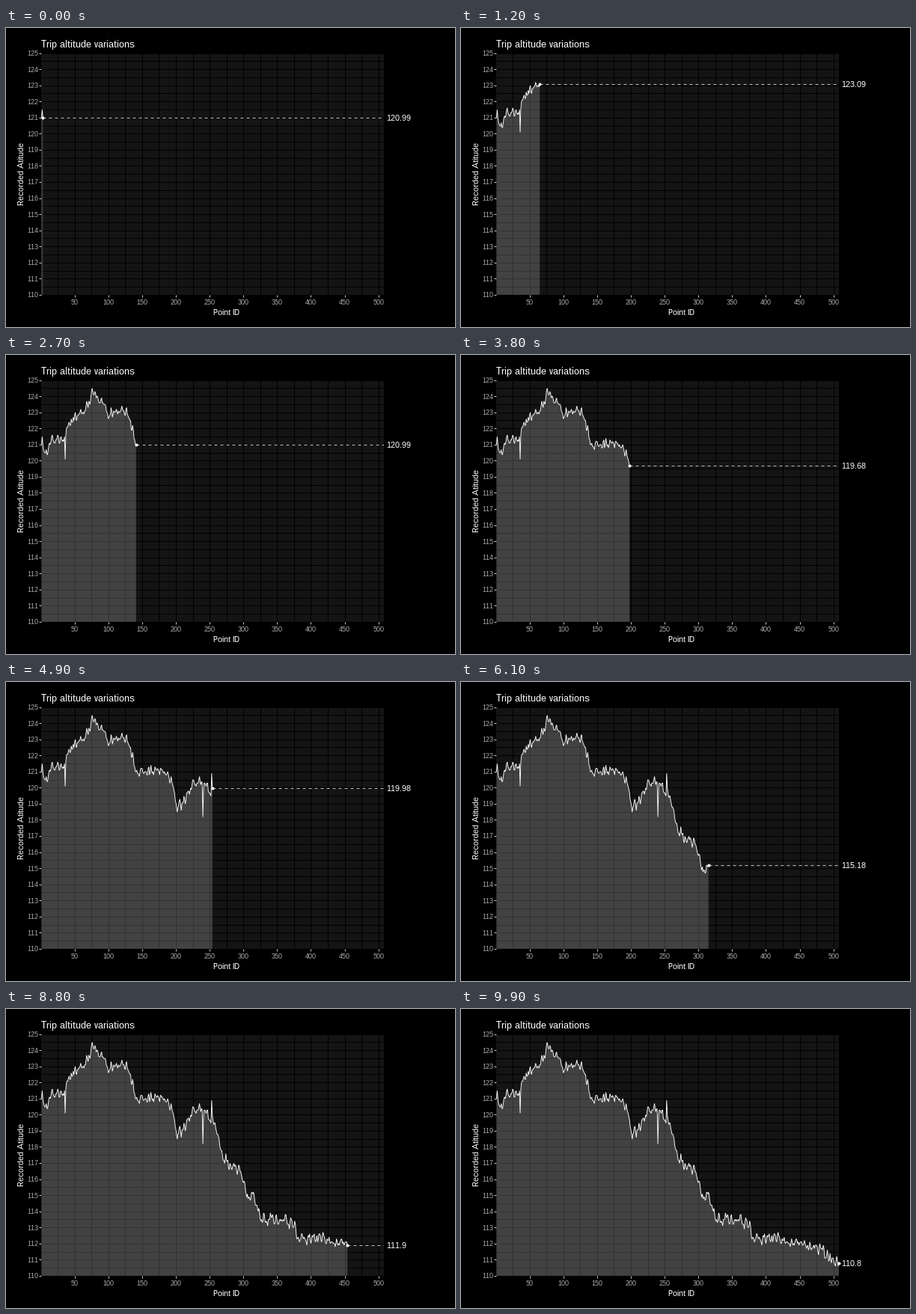
Write a matplotlib script that moves like this. It is 600 by 400 pixels and loops after 10000 ms.

```python
import matplotlib.pyplot as plt
import numpy as np
from matplotlib.animation import FuncAnimation
from matplotlib.ticker import MultipleLocator

W, H, PX = 600, 400, 0.72  # stage in pixels, points per pixel at 100 dpi
LEFT, RIGHT, UPPER, LOWER = 47.46, 504.87, 33.5, 356.9  # panel edges in pixels
FRAMES, STEP_MS = 100, 100
POINTS, FLOOR, TOP = 508, 110, 125

# Key points of the trip (point id, altitude) and single-reading spikes
TURNS = [
    (1, 121), (3, 121), (9, 120.4), (17, 121.6), (35, 121.5), (41, 122.3),
    (65, 123.1), (77, 124.3), (103, 122.9), (127, 123.3), (141, 121),
    (178, 121.2), (194, 120.4), (202, 118.5), (226, 120.5), (254, 120),
    (271, 117.2), (295, 116.5), (307, 114.8), (315, 115.2), (325, 113.5),
    (372, 113.4), (382, 112.3), (403, 112.4), (475, 111.9), (508, 110.8),
]
SPIKES = {2: 0.5, 36: -1.5, 240: -2, 253: 0.9}


def make_track():
    """Altitudes through the key points, with sensor jitter in 0.1 steps."""
    ids = np.arange(1, POINTS + 1)
    turn_ids, turn_alts = np.array(TURNS).T
    alt = np.interp(ids, turn_ids, turn_alts)
    noise = np.random.default_rng(7).normal(0, 0.3, POINTS)
    jitter = np.convolve(noise, [0.5, 0.5], "same").clip(-0.5, 0.5)
    jitter[turn_ids.astype(int) - 1] = 0
    for at, jump in SPIKES.items():
        jitter[at - 1] = jump
    alt = np.round(alt + jitter, 1)
    drift = np.select([alt > 120.5, alt > 114], [0.01, 0.02], 0)
    return ids, np.round(alt - drift, 2)


ids, alt = make_track()

plt.rcParams.update({
    "font.family": "Liberation Sans",
    "text.hinting": "native",
    "text.hinting_factor": 1,
})
fig = plt.figure(figsize=(W / 100, H / 100), dpi=100, facecolor="black")
ax = fig.add_axes([LEFT / W, 1 - LOWER / H, (RIGHT - LEFT) / W,
                   (LOWER - UPPER) / H], facecolor="#141414")
ax.set(xlim=(1, POINTS), ylim=(FLOOR, TOP))
ax.set_axisbelow(True)
ax.spines[:].set_visible(False)

for axis, step in ((ax.xaxis, 50), (ax.yaxis, 1)):
    axis.set_major_locator(MultipleLocator(step))
    axis.set_minor_locator(MultipleLocator(step / 2))
ax.grid(which="both", color="black", lw=PX)
ax.tick_params(which="minor", length=0)
ax.tick_params(which="major", length=3 * PX, width=PX, color="#cccccc",
               labelcolor="#b3b3b3", labelsize=9 * PX)
ax.tick_params(axis="x", pad=3.6 * PX)
ax.tick_params(axis="y", pad=1.5 * PX)


def caption(x, y, text, size, **kw):
    fig.text(x / W, 1 - y / H, text, color="white", fontsize=size * PX, **kw)


caption(47, 26, "Trip altitude variations", 13)
caption(294.5, 384, "Point ID", 11, ha="center")
caption(21.5, 195, "Recorded Atitude", 11, rotation=90, ha="center", va="center")

area, = ax.fill([1], [FLOOR], color="white", alpha=0.2, lw=0, zorder=2)
guide, = ax.plot([], [], color="#bebebe", lw=PX, ls=(0, (4, 4)),
                 dash_capstyle="butt", zorder=3)
trace, = ax.plot([], [], color="white", lw=0.9 * PX, solid_joinstyle="bevel",
                 clip_on=False, zorder=4)
dot, = ax.plot([], [], "o", color="white", ms=4 * PX, mew=0,
               clip_on=False, zorder=5)
label = ax.text(511.5, FLOOR, "", color="white", fontsize=11 * PX,
                va="center_baseline")


def draw(frame):
    # A point shows once its time, rounded to the nearest step, is reached.
    reach = (frame + 0.5) * (POINTS - 1) / (FRAMES - 1)
    n = min(POINTS, int(reach) + 1)
    x, y = ids[:n], alt[:n]
    head_x, head_y = x[-1], y[-1]
    area.set_xy(np.column_stack([np.r_[1, x, head_x], np.r_[FLOOR, y, FLOOR]]))
    trace.set_data(x, y)
    guide.set_data([head_x, POINTS], [head_y, head_y])
    dot.set_data([head_x], [head_y])
    label.set_y(head_y)
    label.set_text(f"{head_y:.2f}".rstrip("0").rstrip("."))
    return area, trace, guide, dot, label


anim = FuncAnimation(fig, draw, frames=FRAMES, interval=STEP_MS,
                     repeat=True, repeat_delay=0, blit=False)
plt.show()
```
